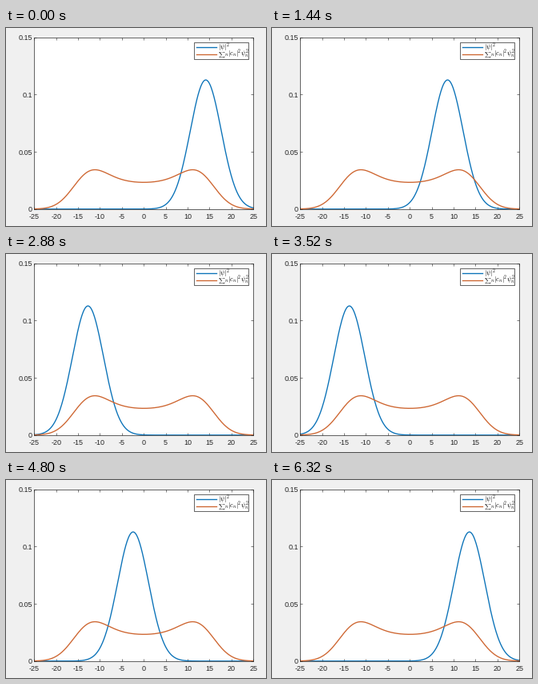
A matplotlib script that plays this animation: 325 by 248 pixels, repeating every 6.4 s.

```python
import numpy as np
import matplotlib.pyplot as plt
from matplotlib.animation import FuncAnimation
from matplotlib.patches import Rectangle

W, H, DPI = 325, 248, 64
PX = 72 / DPI  # points per pixel
FRAMES, INTERVAL = 80, 80

BLUE, ORANGE, INK = "#0A72B8", "#CE6631", "#262626"
LEFT, RIGHT, TOP, BOTTOM = 35.2, 309.2, 11.8, 226.8
CURVE, BORDER = 1.35 * PX, 0.7 * PX

SIGMA = 5.0
AMPLITUDE = 2 * np.sqrt(2) * SIGMA  # coherent state with alpha = 2

# Phase of the oscillation at a few steps; the playback speed drifts a little.
STEPS = np.array([0, 11, 26, 36, 52, 70, 79])
PHASES = np.array([0, 0.395, 1.668, 2.69, 3.975, 5.255, 6.006])
RATES = np.gradient(PHASES, STEPS)


def phase(k):
    """Cubic Hermite interpolation of the phase at step k."""
    i = min(np.searchsorted(STEPS, k, side="right") - 1, len(STEPS) - 2)
    h = STEPS[i + 1] - STEPS[i]
    s = (k - STEPS[i]) / h
    return ((1 + 2 * s) * (1 - s) ** 2 * PHASES[i]
            + s * (1 - s) ** 2 * h * RATES[i]
            + s ** 2 * (3 - 2 * s) * PHASES[i + 1]
            + s ** 2 * (s - 1) * h * RATES[i + 1])


def packet(x, center):
    return np.exp(-((x - center) / SIGMA) ** 2) / (SIGMA * np.sqrt(np.pi))


plt.rcParams.update({"font.family": "Liberation Sans", "mathtext.fontset": "cm",
                     "axes.unicode_minus": False})
fig = plt.figure(figsize=(W / DPI, H / DPI), dpi=DPI, facecolor="#F0F0F0")
ax = fig.add_axes([LEFT / W, 1 - BOTTOM / H, (RIGHT - LEFT) / W, (BOTTOM - TOP) / H])
ax.set(xlim=(-25, 25), ylim=(0, 0.15), xticks=range(-25, 26, 5))
ax.set_yticks([0, 0.05, 0.1, 0.15], ["0", "0.05", "0.1", "0.15"])
ax.tick_params(direction="in", top=True, right=True, length=2.7 * PX,
               width=0.6 * PX, color=INK, labelcolor=INK, labelsize=9 * PX)
ax.tick_params(axis="x", pad=5.5 * PX)
ax.tick_params(axis="y", pad=2.5 * PX)
for spine in ax.spines.values():
    spine.set(linewidth=BORDER, color=INK)

x = np.linspace(-25, 25, 501)
angles = np.linspace(0, 2 * np.pi, 200, endpoint=False)
average = packet(x[:, None], AMPLITUDE * np.cos(angles)).mean(axis=1)
wave, = ax.plot(x, packet(x, AMPLITUDE), color=BLUE, lw=CURVE)
ax.plot(x, average, color=ORANGE, lw=CURVE)

# Legend, laid out in pixels from the top left corner.
key = fig.add_axes([0, 0, 1, 1])
key.set(xlim=(0, W), ylim=(H, 0))
key.axis("off")
key.add_patch(Rectangle((235.2, 17.8), 68, 21, fc="white", ec=INK, lw=BORDER))
for y, color in [(23.5, BLUE), (33, ORANGE)]:
    key.plot([238, 263], [y, y], color=color, lw=CURVE)


def formula(px, py, text, size):
    key.text(px, py, text, color="black", size=size * PX, va="baseline")


formula(264.8, 25.8, r"$|\psi|^2$", 8.2)
formula(264.8, 35, r"$\sum$", 5.5)
formula(272.8, 35.4, r"$_n|c_n|^2\psi_n^2$", 8.2)


def draw(k):
    wave.set_ydata(packet(x, AMPLITUDE * np.cos(phase(k))))
    return wave,


anim = FuncAnimation(fig, draw, frames=FRAMES, interval=INTERVAL, repeat=True)
plt.show()
```
